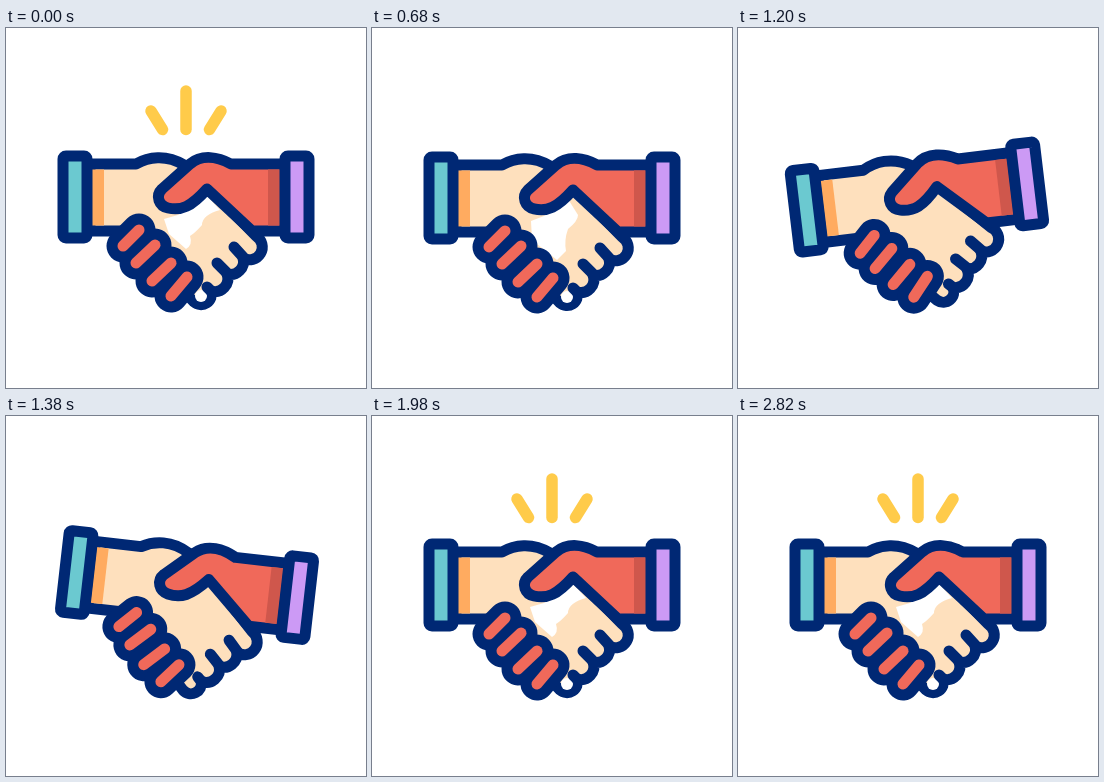
Animation of 360 by 360 pixels, one loop 3000 ms. Source, as an HTML page:

```html
<!DOCTYPE html>
<html lang="en">
<head>
<meta charset="utf-8">
<title>Handshake</title>
<style>
  html, body { margin: 0; width: 100%; height: 100%; overflow: hidden; background: #fff; }
  svg { display: block; width: 100vw; height: 100vh; }
  .line { stroke: #002874; stroke-width: 11; stroke-linecap: round; stroke-linejoin: round; }
</style>
</head>
<body>
<svg viewBox="0 0 360 360">
  <g id="rays" stroke-width="11.5" stroke-linecap="round"></g>
  <g id="hands" fill="none">
    <path id="palm" class="line" fill="#fee0bd" d="M84 136H130C142 129 160 126 178 137L203 160L250 208
      A12 12 0 0 1 237 230A13 13 0 0 1 221 246A13 13 0 0 1 205 263A10.5 10.5 0 0 1 188 274L165 250L115 203H84Z"/>
    <path fill="#ffab60" d="M86 141.5h12v56h-12z"/>
    <path id="shine" fill="#fff"/>
    <circle id="tip" cx="195" cy="268" r="6" fill="#fff"/>
    <path class="line" d="M228 219L238 230M211 235L222 246M201 259L205 263"/>
    <path class="line" fill="#f0695a" d="M279 136H225C212 129 196 126 184 136L156 161
      C149 168 153 178 162 180C175 183 185 179 201 161L246 203H279Z"/>
    <path fill="#cf574c" d="M262 141.5h12v56h-12z"/>
    <g id="fingers" stroke-linecap="round"></g>
    <rect class="line" x="57" y="128" width="24" height="82" rx="3" fill="#6bc9d0"/>
    <rect class="line" x="279" y="128" width="24" height="82" rx="3" fill="#cc9af5"/>
  </g>
</svg>
<script>
const LOOP = 3000;
const byId = id => document.getElementById(id);
const lerp = (a, b, k) => a + (b - a) * k;
const ease = k => (1 - Math.cos(Math.PI * k)) / 2;
const progress = (t, from, to) => ease(Math.min(1, Math.max(0, (t - from) / (to - from))));

function addLine(parent, [x1, y1, x2, y2], attrs = {}) {
  const line = document.createElementNS("http://www.w3.org/2000/svg", "line");
  for (const [key, value] of Object.entries({ x1, y1, x2, y2, ...attrs })) line.setAttribute(key, value);
  parent.append(line);
  return line;
}

const fingers = [[117, 218, 133, 202], [130, 235, 149, 217], [146, 253, 165, 235], [165, 268, 181, 249]];
for (const [color, width] of [["#002874", 33], ["#f0695a", 11]])
  for (const finger of fingers) addLine(byId("fingers"), finger, { stroke: color, "stroke-width": width });

// Each ray runs from its inner end to its outer end.
const rays = [[156.5, 101.5, 145, 83], [180, 101.5, 180, 63], [203.5, 101.5, 215, 83]]
  .map(ends => ({ ends, line: addLine(byId("rays"), ends) }));

// Keys are [time, value], eased between neighbours.
const lift = [[100, 0], [300, -9.5], [490, 9.5], [730, 0]];
const tilt = [[780, 0], [1000, 6.8], [1200, -6.8], [1400, 6.8], [1600, -6.8], [1820, 0]];

function valueAt(keys, t) {
  let value = keys[0][1];
  for (let i = 1; i < keys.length; i++)
    if (t > keys[i - 1][0]) value = lerp(keys[i - 1][1], keys[i][1], progress(t, keys[i - 1][0], keys[i][0]));
  return value;
}

const bursts = [
  { grow: [-560, -180], leave: [0, 240] },
  { grow: [1420, 1800], leave: [1980, 2220] },
  { grow: [2440, 2820], leave: [3000, 3240] }
];

const smallShine = "M158 191L172 187L200 167L214 182Q196 187 196 197Q189 205 184 208Q187 217 180 221L163 206Z";
const largeShine = "M159 192L172 187L196 170L206 186Q206 192 196 200Q192 211 194 222L185 231L160 211Z";

function drawRays(t) {
  const burst = bursts.find(b => t >= b.grow[0] && t < b.leave[1]);
  byId("rays").style.display = burst ? "" : "none";
  if (!burst) return;
  const head = progress(t, ...burst.grow);
  const tail = progress(t, ...burst.leave);
  const color = `rgb(255,${lerp(178, 203, head)},${lerp(102, 74, head)})`;
  for (const { ends: [x1, y1, x2, y2], line } of rays) {
    line.setAttribute("x1", lerp(x1, x2, tail));
    line.setAttribute("y1", lerp(y1, y2, tail));
    line.setAttribute("x2", lerp(x1, x2, head));
    line.setAttribute("y2", lerp(y1, y2, head));
    line.setAttribute("stroke", color);
  }
}

function draw(t) {
  drawRays(t);
  byId("hands").setAttribute("transform",
    `translate(0 ${valueAt(lift, t)}) rotate(${valueAt(tilt, t)} 180 178)`);
  const shine = t < 400 || t > 1900 ? smallShine : t < 780 ? largeShine : "";
  byId("shine").setAttribute("d", shine);
  byId("tip").style.display = t < 780 || t > 1500 ? "" : "none";
}

const start = performance.now();
function tick() {
  draw((performance.now() - start) % LOOP);
  requestAnimationFrame(tick);
}
tick();
</script>
</body>
</html>
```
